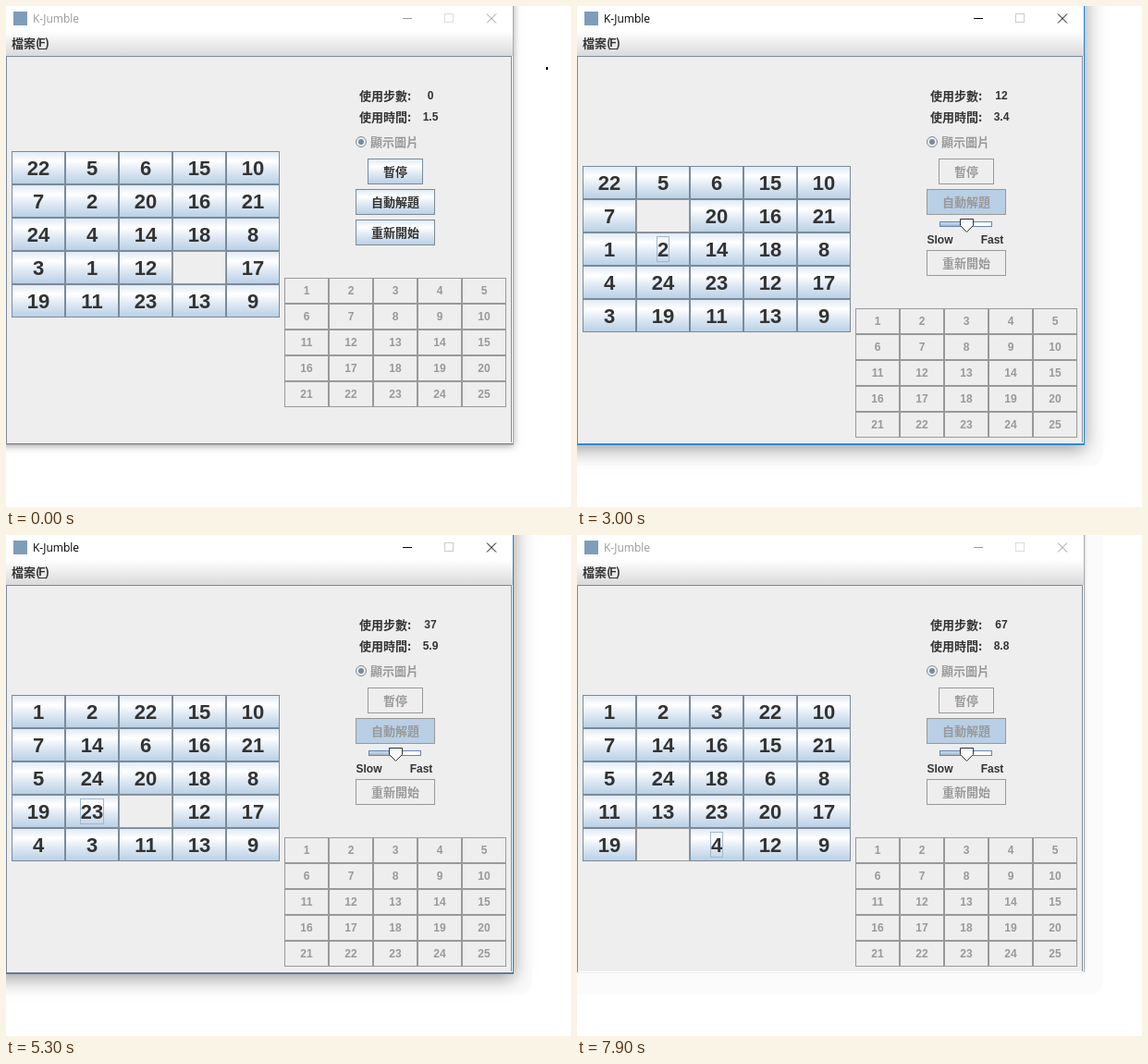
An HTML page with a canvas that plays this animation: 611 px wide and 542 px high, repeating every 8000 ms.

```html
<!DOCTYPE html>
<html lang="zh-Hant">
<head>
<meta charset="utf-8">
<style>
html, body { margin: 0; overflow: hidden; background: #fff }
canvas { display: block }
</style>
</head>
<body>
<canvas id="stage" width="611" height="542"></canvas>
<script>
const ctx = document.getElementById('stage').getContext('2d');
const CJK = '"Noto Sans CJK TC", "Noto Sans CJK JP", "Noto Sans CJK", sans-serif';
const ARIAL = '"Liberation Sans", sans-serif';
const EDGE = '#7a8a99', GREY = '#999', INK = '#333', FACE = '#eee';

const START = [22, 5, 6, 15, 10, 7, 2, 20, 16, 21, 24, 4, 14, 18, 8,
  3, 1, 12, 0, 17, 19, 11, 23, 13, 9];
// Direction of the gap at each step
const MOVES = 'LDLLUURDLURU' + 'LDRUULDR' + 'DLURDRUULDDDDLURR' +
  'DLURDRUULDR' + 'UULDRUULDDDDLLURRDL';
const SHIFT = { L: -1, R: 1, U: -5, D: 5 };
// [ms, steps made]
const PACE = [[1900, 0], [3000, 12], [3700, 20], [5300, 37], [6300, 48], [7900, 67]];

function stepsAt(t) {
  for (let i = 1; i < PACE.length; i++) {
    const [t0, s0] = PACE[i - 1], [t1, s1] = PACE[i];
    if (t <= t1) return Math.max(0, Math.floor(s0 + (s1 - s0) * (t - t0) / (t1 - t0)));
  }
  return MOVES.length;
}

function boardAt(steps) {
  const cells = [...START];
  let gap = cells.indexOf(0), focus = -1;
  for (const move of MOVES.slice(0, steps)) {
    focus = gap;
    gap += SHIFT[move];
    cells[focus] = cells[gap];
    cells[gap] = 0;
  }
  return { cells, focus };
}

function rect(x, y, w, h, fill, stroke) {
  if (fill) {
    ctx.fillStyle = fill;
    ctx.fillRect(x, y, w, h);
  }
  if (stroke) {
    ctx.strokeStyle = stroke;
    ctx.strokeRect(x + .5, y + .5, w - 1, h - 1);
  }
}

function text(str, x, y, color, font, align = 'center') {
  ctx.font = font;
  ctx.fillStyle = color;
  ctx.textAlign = align;
  ctx.fillText(str, x, y);
}
const label = (str, x, y, color = INK, align = 'left') =>
  text(str, x, y, color, 'bold 13px ' + CJK, align);
const small = (str, x, y, color = INK) => text(str, x, y, color, 'bold 12px ' + ARIAL);

function path(points, stroke, fill) {
  ctx.beginPath();
  points.forEach(([x, y], i) => i ? ctx.lineTo(x, y) : ctx.moveTo(x, y));
  if (fill) {
    ctx.closePath();
    ctx.fillStyle = fill;
    ctx.fill();
  }
  ctx.strokeStyle = stroke;
  ctx.stroke();
}

function gradient(y, h, ...stops) {
  const g = ctx.createLinearGradient(0, y, 0, y + h);
  stops.forEach(([at, color]) => g.addColorStop(at, color));
  return g;
}
const glossy = (y, h) =>
  gradient(y, h, [0, '#dde8f3'], [.3, '#fff'], [.6, '#dde8f3'], [1, '#b8cfe5']);

function button(str, x, y, w, enabled, pressed) {
  const fill = pressed ? '#b8cfe5' : enabled ? glossy(y, 28) : FACE;
  rect(x, y, w, 28, fill, enabled ? EDGE : GREY);
  label(str, x + w / 2, y + 18.5, enabled ? INK : GREY, 'center');
}

function windowFrame(t, active) {
  if (t >= 500) {
    ctx.fillStyle = '#fbfbfb';
    ctx.beginPath();
    ctx.roundRect(-20, -20, 589, 517, 14);
    ctx.fill();
  }
  const closing = t >= 7300;
  ctx.save();
  ctx.shadowColor = active ? 'rgba(0,0,0,.4)' : closing ? 'rgba(0,0,0,.2)' : 'rgba(0,0,0,.35)';
  ctx.shadowBlur = active ? 18 : closing ? 3 : 8;
  ctx.shadowOffsetY = active ? 4 : closing ? -3 : 1;
  rect(-20, -20, 569, closing ? 493 : 495, active ? '#1883d7' : '#aaa');
  ctx.restore();

  rect(0, 0, 548, 27, '#fff');
  rect(8, 6, 15, 15, '#7f9db9');
  const ink = active ? '#000' : GREY;
  text('K-Jumble', 29, 18, ink, '12px "Open Sans", sans-serif', 'left');
  rect(429, 13, 10, 1, ink);
  rect(474, 8, 10, 10, null, active ? '#ccc' : '#ddd');
  path([[520, 8.5], [530, 18.5]], ink);
  path([[530, 8.5], [520, 18.5]], ink);

  rect(0, 27, 548, 27, gradient(27, 27, [0, '#fff'], [1, '#dadada']));
  label('檔案(', 6, 45);
  small('F', 39, 44);
  label(')', 42, 45);
  rect(36, 46, 7, 1, INK);

  rect(0, 54, 548, 420, FACE);
  rect(0, 54, 547, 419, null, EDGE);
  rect(1, 472, 547, 1, '#fff');
  rect(547, 54, 1, 419, '#fff');
  if (!closing) rect(0, 473, 548, 1, EDGE);
}

function tiles(top, { cells, focus }) {
  cells.forEach((n, i) => {
    const x = 6 + i % 5 * 58, y = top + Math.floor(i / 5) * 36;
    rect(x, y, 58, 36, n ? glossy(y, 36) : FACE, n ? EDGE : GREY);
    if (!n) return;
    text(n, x + 29, y + 26, INK, 'bold 22px ' + ARIAL);
    if (i === focus) {
      const w = n > 9 ? 26 : 14;
      rect(x + 29 - w / 2, y + 4, w, 28, null, '#a3b8cc');
    }
  });
}

function goal(top) {
  for (let i = 0; i < 25; i++) {
    const x = 301 + i % 5 * 48, y = top + Math.floor(i / 5) * 28;
    rect(x, y, 48, 28, null, GREY);
    small(i + 1, x + 24, y + 18, GREY);
  }
}

function radio() {
  ctx.strokeStyle = EDGE;
  ctx.beginPath();
  ctx.arc(384, 147, 5.5, 0, 7);
  ctx.stroke();
  ctx.fillStyle = EDGE;
  ctx.beginPath();
  ctx.arc(384, 147, 3, 0, 7);
  ctx.fill();
  label('顯示圖片', 394, 151.5, GREY);
}

function slider() {
  rect(392, 233, 57, 6, '#fff', '#6382bf');
  rect(393, 234, 28, 4, gradient(234, 4, [0, '#c8ddf2'], [1, '#a3b8cc']));
  path([[414.5, 230.5], [428.5, 230.5], [428.5, 237.5], [421.5, 244.5], [414.5, 237.5], [414.5, 230.5]],
    INK, gradient(230, 14, [0, '#dde8f3'], [.4, '#fff'], [1, '#eef3f8']));
  small('Slow', 392.5, 257);
  small('Fast', 449, 257);
}

function draw(t) {
  const solving = t >= 1900, active = t >= 500 && t < 6200;
  const steps = stepsAt(t);
  const clock = 1.55 + .0011 * (Math.min(t, 600) + Math.max(0, t - 1900));

  rect(0, 0, 611, 542, '#fff');
  windowFrame(t, active);
  if (t < 300) rect(584, 66, 2, 3, '#000');

  label('使用步數:', 382, 101.5);
  small(steps, 459, 101);
  label('使用時間:', 382, 124.5);
  small((Math.floor(clock * 10) / 10).toFixed(1), 459, 124);
  radio();
  button('暫停', 391, 165, 60, !solving);
  button('自動解題', 378, 198, 86, !solving, t >= 500);
  if (t >= 500 && !steps) rect(394, 202, 54, 20, null, '#a3b8cc');
  if (solving) slider();
  button('重新開始', 378, solving ? 264 : 231, 86, !solving);
  tiles(solving ? 173 : 157, boardAt(steps));
  goal(solving ? 327 : 294);
}

function tick() {
  draw(Math.floor(performance.now() % 8000 / 100) * 100);
  requestAnimationFrame(tick);
}
tick();
</script>
</body>
</html>
```
